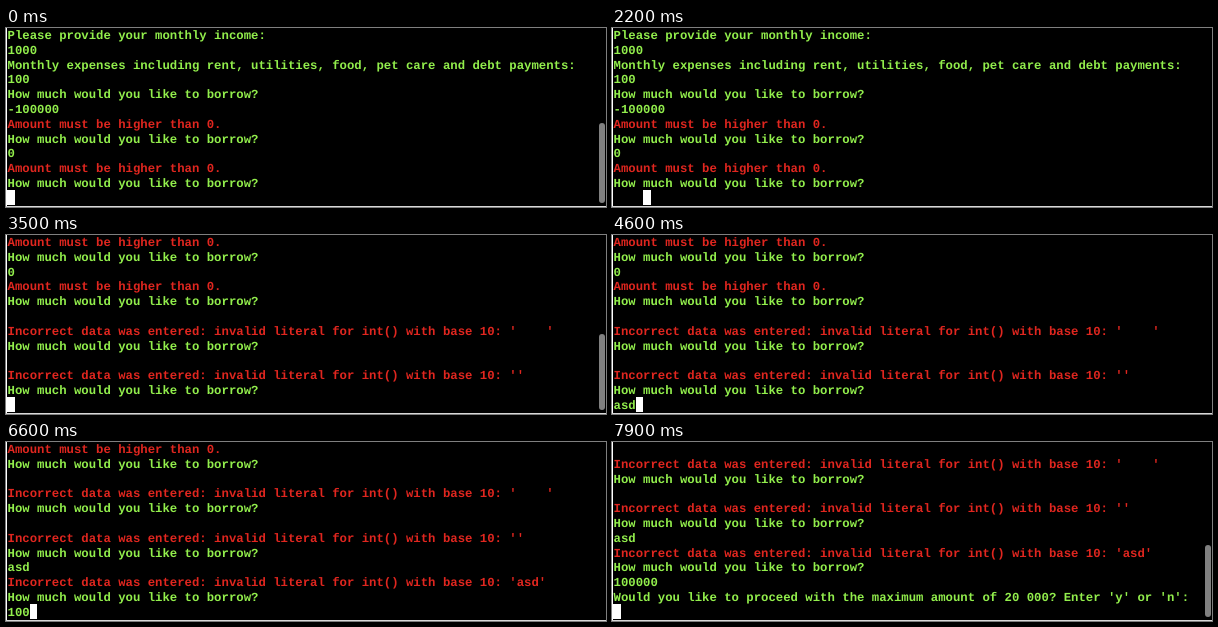
Write an HTML page that moves like this. It is 600x179 px and loops after 8000 ms.

```html
<!DOCTYPE html>
<html lang="en">
<head>
<meta charset="utf-8">
<title>Loan terminal</title>
<style>
  html, body { margin: 0; width: 100%; height: 100%; overflow: hidden; background: #d8d8d8; }
  #screen {
    position: absolute; left: 0; top: 0; width: 600px; height: 178px;
    box-sizing: border-box; border-left: 1px solid #fff;
    background: #000; overflow: hidden;
  }
  #text {
    position: absolute; left: .5px; top: 0; margin: 0;
    font: bold 12.3px/14.8px "Courier New", "Liberation Mono", monospace;
    text-rendering: geometricPrecision; color: #92ee4c;
    transform: translateY(.8px);
  }
  #text div { height: 14.8px; white-space: pre; }
  #text .error { color: #e0261f; }
  #cursor { position: absolute; top: 162.4px; width: 7.6px; height: 14.6px; background: #fff; }
  #bar { position: absolute; left: 592.4px; width: 6px; border-radius: 3px; background: #808080; }
</style>
</head>
<body>
<div id="screen">
  <div id="text"></div>
  <div id="cursor"></div>
  <div id="bar"></div>
</div>
<script>
const LOOP = 8000, ROWS = 12, CHAR = 7.38;
const ask = 'How much would you like to borrow?';
const low = 'Amount must be higher than 0.';
const bad = s => `Incorrect data was entered: invalid literal for int() with base 10: '${s}'`;

const history = [
  'Please provide your monthly income:', '1000',
  'Monthly expenses including rent, utilities, food, pet care and debt payments:', '100',
  ask, '-100000', low, ask, '0', low, ask
];

// Each entry: typed keys, time of each key, time of Enter, printed reply
const entries = [
  { keys: '    ', at: [1300, 1500, 1700, 1900], enter: 2500, reply: [bad('    '), ask] },
  { keys: '', at: [], enter: 3100, reply: [bad(''), ask] },
  { keys: 'asd', at: [4100, 4200, 4400], enter: 4900, reply: [bad('asd'), ask] },
  { keys: '100000', at: [6200, 6500, 6600, 6800, 6900, 7100], enter: 7500,
    reply: ["Would you like to proceed with the maximum amount of 20 000? Enter 'y' or 'n':"] }
];

const [text, cursor, bar] = ['text', 'cursor', 'bar'].map(id => document.getElementById(id));
const rows = Array.from({ length: ROWS }, () => text.appendChild(document.createElement('div')));

function stateAt(t) {
  const lines = [...history];
  let input = '', scrolled = -400;
  for (const e of entries) {
    if (t < e.enter) {
      input = e.keys.slice(0, e.at.filter(k => k <= t).length);
      break;
    }
    lines.push(e.keys, ...e.reply);
    scrolled = e.enter;
  }
  return { lines: [...lines, input], input, scrolled };
}

function draw(now) {
  const t = now % LOOP;
  const { lines, input, scrolled } = stateAt(t);
  const first = lines.length - ROWS;
  rows.forEach((row, i) => {
    const line = lines[first + i];
    if (row.textContent !== line) row.textContent = line;
    row.className = /^(Amount|Incorrect)/.test(line) ? 'error' : '';
  });
  cursor.style.left = .4 + input.length * CHAR + 'px';

  const top = 95 + first * .72;
  bar.style.top = top + 'px';
  bar.style.height = 175 - top + 'px';
  // The scrollbar lingers after a scroll, then fades
  bar.style.opacity = Math.max(0, Math.min(1, 1 - (t - scrolled - 600) / 250));
}

const start = performance.now();
function frame() {
  draw(performance.now() - start);
  requestAnimationFrame(frame);
}
frame();
</script>
</body>
</html>
```
